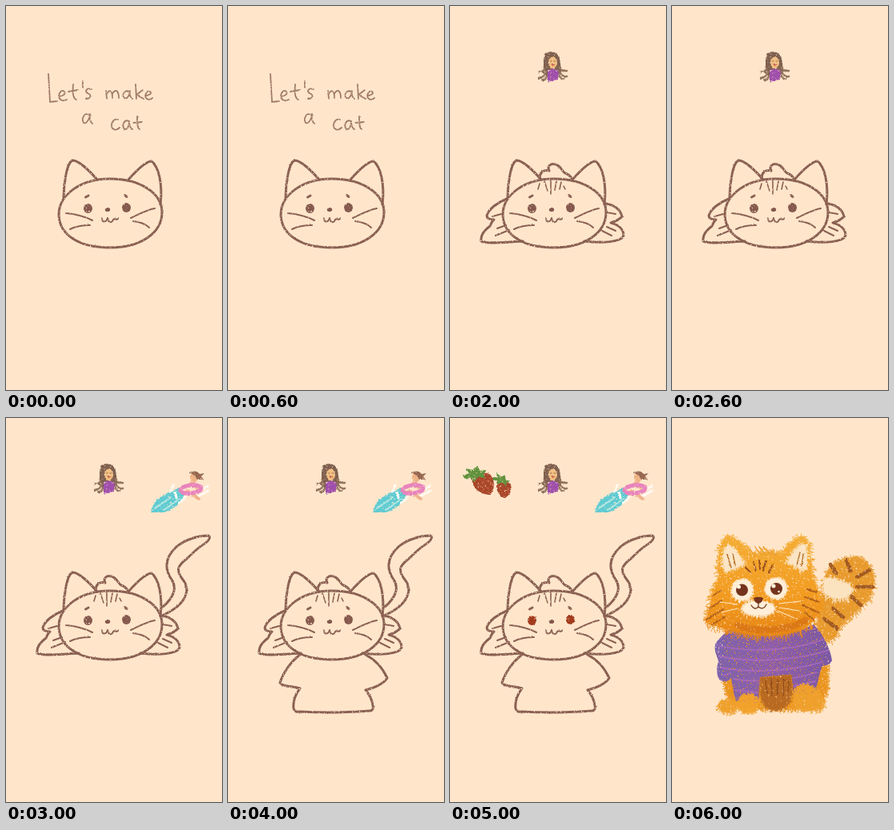
These frames come from a looping animation (270x480 px, 7 s). An HTML page:

```html
<!DOCTYPE html>
<html lang="en">
<head>
<meta charset="utf-8">
<title>Let's make a cat</title>
<style>
  html, body { margin: 0; height: 100%; overflow: hidden; background: #ffe6cb; }
  svg { display: block; width: 100vw; height: 100vh; }
  path, ellipse { stroke-linecap: round; stroke-linejoin: round; }
  .line { fill: none; stroke: #8a6052; stroke-width: 3; }
  .thin { stroke-width: 2; }
  .letters { stroke: #a07b68; stroke-width: 1.8; }
  .dot { fill: #85594d; stroke: none; }
  .chalk { filter: url(#chalk); }
  .pastel { filter: url(#pastel); }
  .stroke { fill: none; }
</style>
</head>
<body>
<svg viewBox="0 0 270 480" role="img" aria-label="Let's make a cat">
  <defs>
    <filter id="chalk" filterUnits="userSpaceOnUse" x="0" y="0" width="270" height="480" color-interpolation-filters="sRGB">
      <feTurbulence type="fractalNoise" baseFrequency=".55" numOctaves="2" seed="4" result="noise"/>
      <feDisplacementMap in="SourceGraphic" in2="noise" scale="1.8" xChannelSelector="R" yChannelSelector="G" result="rough"/>
      <feColorMatrix in="noise" values="0 0 0 0 0  0 0 0 0 0  0 0 0 0 0  0 0 0 6 -1.3"/>
      <feComposite in="rough" operator="in"/>
    </filter>
    <filter id="pastel" filterUnits="userSpaceOnUse" x="0" y="0" width="270" height="480" color-interpolation-filters="sRGB">
      <feTurbulence type="fractalNoise" baseFrequency=".4" numOctaves="3" seed="9" result="noise"/>
      <feDisplacementMap in="SourceGraphic" in2="noise" scale="3" xChannelSelector="R" yChannelSelector="G" result="rough"/>
      <feColorMatrix in="noise" values="0 0 0 0 0  0 0 0 0 0  0 0 0 0 0  0 0 0 4 -.5"/>
      <feComposite in="rough" operator="in"/>
    </filter>
    <linearGradient id="orange" gradientUnits="userSpaceOnUse" x1="0" y1="150" x2="0" y2="275">
      <stop stop-color="#f4ad35"/>
      <stop offset=".6" stop-color="#f29a1f"/>
      <stop offset="1" stop-color="#e68413"/>
    </linearGradient>
    <linearGradient id="violet" gradientUnits="userSpaceOnUse" x1="52" y1="0" x2="200" y2="0">
      <stop stop-color="#7c62ad"/>
      <stop offset=".5" stop-color="#8e5eaa"/>
      <stop offset="1" stop-color="#7a58a5"/>
    </linearGradient>
  </defs>

  <!-- data-show: first second, end second -->
  <g data-show="0 1" class="line letters chalk">
    <path d="M53 85L55 120L64 119M66 113C71 113 75 110 73 107C70 104 66 108 66 113C67 119 73 119 76 117M84 98C83 108 84 116 88 117M78 107L90 105M96 94L96 102M107 104C100 102 98 107 102 109C107 111 107 116 100 116"/>
    <path d="M125 106L126 116M126 110C129 104 133 105 133 115M133 110C136 103 141 105 141 115M154 107C148 104 144 112 148 115C152 117 155 110 155 106C154 111 156 115 158 116M162 98L163 116M171 105L163 111L172 116M174 112C179 112 183 109 180 107C176 105 173 111 175 115C177 118 181 117 183 115"/>
    <path d="M104 136C98 132 94 141 97 146C101 148 105 140 105 135C104 141 106 146 108 147M140 142C134 140 130 148 133 153C136 156 140 154 142 152M154 144C148 141 144 149 148 154C152 155 154 149 154 144C154 150 156 153 158 154M164 138C164 146 164 153 167 154M159 146L170 145"/>
  </g>

  <g data-show="0 6" class="line chalk">
    <path d="M66 261C66 236 93 216 130 216C168 216 195 234 195 258C195 284 168 302 130 302C92 302 67 287 66 261Z"/>
    <path d="M72 240C72 222 76 196 83 193C92 193 105 207 114 217M153 217C161 208 174 194 182 194C191 201 196 223 193 248"/>
    <path class="thin" d="M75 259C88 260 98 263 108 268M80 279C88 275 97 274 105 274M156 265C165 261 175 255 186 253M159 269C168 270 175 273 179 277"/>
    <path class="thin" d="M120 265C120 271 125 271 127 265C128 271 132 272 134 267C136 265 138 268 140 266"/>
    <path d="M99.500 239L103 237M148.500 236.500L151 238.500"/>
    <ellipse class="dot" cx="127" cy="254.500" rx="3.200" ry="2.600"/>
    <g id="eyes">
      <ellipse class="dot" cx="102.500" cy="253" rx="5.500" ry="6"/>
      <ellipse class="dot" cx="150.500" cy="252" rx="5.500" ry="6"/>
    </g>
  </g>

  <g data-show="5 6" class="pastel" fill="#a33a1c">
    <ellipse cx="102.500" cy="253" rx="5.500" ry="6"/>
    <ellipse cx="150.500" cy="252" rx="5.500" ry="6"/>
  </g>

  <g data-show="1 6" class="line chalk">
    <path d="M112 216C112 208 117 204 124 206C121 200 126 196 132 198C139 200 140 207 144 209C148 210 151 213 153 217"/>
    <path d="M71 241C60 245 48 254 46 262C46 266 51 267 55 267C51 270 52 272 50 275C42 281 38 288 39 294C43 298 70 295 91 294"/>
    <path d="M195 247C206 249 213 255 215 263C212 267 207 269 201 271C209 273 217 278 217 287C214 295 192 297 168 294"/>
  </g>

  <!-- girl -->
  <g data-show="1 6" class="pastel">
    <path fill="#80604f" d="M119 59C125 56 133 57 136 62C139 70 137 76 141 80L136 86L120 87L115 83C119 78 115 64 119 59Z"/>
    <path class="stroke" stroke="#94765f" stroke-width="2.500" d="M118 78Q117 83 111 82M119 82Q119 89 111 90M121 88Q119 93 115 92M137 77Q140 82 146 81M137 82Q140 89 146 88M137 87Q138 92 142 91"/>
    <path fill="#a050ab" d="M122 81C126 78 132 78 136 82L135 92C130 94 126 93 122 95Z"/>
    <ellipse fill="#efbd80" cx="128.500" cy="71" rx="5.500" ry="7.500"/>
    <path class="stroke" stroke="#70473a" d="M126 69h.5M131 69h.5"/>
    <path class="stroke" stroke="#c14f42" d="M126.500 73.500h4"/>
  </g>

  <g data-show="2 6" class="line thin chalk">
    <path style="stroke-width:1.600" d="M112 222L110 229M118 219L122 231M126 218L126 235M133 219L131 230M139 220L137 229M142 225L144 229"/>
    <path d="M53 263L64 260M59 278L70 274M57 287L74 280M196 258L207 260M196 276L207 281M188 280L202 287"/>
  </g>

  <g data-show="3 6" class="line chalk">
    <path d="M196 236C208 226 215 213 207 202C197 187 200 173 213 161C225 151 242 147 253 147C257 149 253 154 247 158C240 162 233 169 227 175C214 185 212 190 221 202C231 214 226 233 197 246"/>
  </g>

  <!-- swimmer -->
  <g data-show="3 6" class="pastel">
    <path fill="#5fcbd2" d="M181 118C183 106 192 97 206 92L217 87L223 95C220 105 209 115 197 118Z"/>
    <path class="stroke" stroke="#b4e8e2" stroke-width="2" d="M186 113L206 99M197 115L217 101"/>
    <path class="stroke" stroke="#fffaf3" stroke-width="3" d="M206 92L209 84M211 93L213 99M217 106L224 99M238 99L253 91M247 89L252 85"/>
    <path class="stroke" stroke="#efb48d" stroke-width="4" d="M226 91L241 101M237 77L230 83L239 87"/>
    <ellipse class="stroke" stroke="#e983bd" stroke-width="5" cx="231" cy="89" rx="13" ry="5" transform="rotate(-6 231 89)"/>
    <ellipse fill="#efb485" cx="234" cy="74" rx="4" ry="5"/>
    <path fill="#986850" d="M229 69C234 65 239 66 242 70L248 69L244 73L247 77L239 77L236 72Z"/>
  </g>

  <g data-show="4 6" class="line chalk">
    <path d="M90 296C79 304 69 318 65 331C68 336 80 335 90 338C84 345 81 355 82 363C83 367 86 368 90 367C120 369 150 368 177 366C181 366 182 363 181 359C180 352 177 346 172 340C182 338 195 332 199 325C193 312 184 302 172 296"/>
  </g>

  <g data-show="5 6" class="pastel">
    <g id="berry">
      <path fill="#a9462a" d="M27 76C33 67 49 66 52 73C57 81 55 91 50 96C40 96 28 89 27 76Z"/>
      <path class="stroke" stroke="#d98a58" stroke-width="1.200" stroke-dasharray=".5 4.500" d="M31 79L45 92M37 77L50 90M44 75L51 83"/>
      <path fill="#62923e" d="M16 72L24 69L19 63L29 65L34 60L38 66L46 65L42 70L44 76L36 73L29 80L26 74L19 77Z"/>
    </g>
    <use href="#berry" transform="translate(66 84) rotate(26) scale(.73) translate(-38 -77)"/>
  </g>

  <!-- painted cat -->
  <g data-show="6 7">
    <g class="pastel">
      <path data-fuzz="6" fill="#e89a2c" d="M182 268C184 250 180 235 190 215C188 185 212 172 233 175C251 181 257 205 248 221C241 238 217 246 207 268C200 282 185 280 182 268Z"/>
      <path data-fuzz="7" fill="#fce3bf" d="M190 203C198 195 206 205 216 206C227 209 227 219 218 223C208 228 197 224 190 218Z"/>
      <path class="stroke" stroke="#a35a20" stroke-width="4.500" d="M218 178L223 191M247 190L231 199M251 211L231 211M236 234L224 223M214 249L201 238M198 183L205 194M206 263L190 251"/>
      <path data-fuzz="4" fill="#ea951f" d="M70 270L182 265C192 285 197 318 194 342C188 360 160 366 130 364C100 364 72 362 69 345C62 325 60 290 70 270Z"/>
    </g>
    <g class="chalk">
      <path fill="url(#violet)" d="M74 261C66 270 58 275 54 283C52 292 57 298 58 304C55 313 56 322 59 327C64 331 70 330 74 325C76 337 77 347 81 355L108 357L110 324L149 321L152 345C163 347 176 346 180 341C182 330 184 320 188 310C193 309 199 308 200 303C198 287 188 270 177 258C140 276 100 277 74 261Z"/>
      <path class="stroke" stroke="#a568bf" stroke-width="1.800" d="M57 284C95 294 150 291 189 277M60 298C95 306 150 304 194 291M61 312C95 319 150 317 188 305M63 322L73 319M77 326C105 331 150 329 180 318M79 340L106 343M153 335L179 329"/>
    </g>
    <g class="pastel">
      <path data-fuzz="3" fill="#b86a22" d="M111 325L148 322C152 345 149 363 130 365C113 365 109 350 111 325Z"/>
      <path class="stroke" stroke="#8e4b1c" stroke-width="1.300" d="M117 329L119 345M124 326L125 347M132 327L132 345M140 326L139 347M146 328L145 341"/>
      <ellipse data-fuzz="4" fill="#efa02c" cx="70" cy="360" rx="12" ry="8"/>
      <ellipse data-fuzz="3" fill="#f2a22a" cx="95" cy="357" rx="13" ry="12"/>
      <path data-fuzz="4" fill="#efa02c" d="M153 340C160 332 174 332 179 340C190 346 193 357 188 363C178 367 160 366 153 361C150 353 155 347 153 340Z"/>
    </g>
    <g class="pastel">
      <path data-fuzz="7" fill="url(#orange)" d="M59 202C57 182 58 157 68 148C79 148 91 160 100 171C110 167 125 167 137 170C143 160 153 149 163 148C172 153 175 175 174 195C180 208 185 224 187 237C182 250 170 260 162 264C140 274 100 274 74 266C63 262 51 260 42 255C44 246 50 236 49 228C50 217 54 208 59 202Z"/>
      <path class="stroke" stroke="#db7815" stroke-width="8" d="M82 259C105 269 145 266 167 253"/>
      <path data-fuzz="5" fill="#fbe5c4" d="M67 192C62 180 64 165 70 159C79 163 86 175 90 183ZM145 181C149 170 158 160 165 158C170 168 169 180 166 190Z"/>
      <path class="stroke" stroke="#b8742f" stroke-width="1.500" d="M69 171L74 187M76 170L79 184M160 168L156 184M164 170L162 185"/>
      <path class="stroke" stroke="#eda031" stroke-width="1.800" d="M104 172L95 162M111 171L104 162M117 171L109 161M124 171L114 161M130 172L123 165"/>
      <path class="stroke" stroke="#964c18" stroke-width="2" d="M92 187L98 193M102 180L105 191M109 178L110 189M117 179L114 191M126 183L121 193"/>
      <path class="stroke" stroke="#b0601b" stroke-width="2" d="M169 214L181 218M166 224L184 230M163 234L183 243M166 243L177 252M61 216L51 222M62 228L47 238M64 239L43 252M66 249L50 258"/>
      <g fill="#ffefd8">
        <ellipse data-fuzz="3" cx="88" cy="215" rx="13" ry="13"/>
        <ellipse data-fuzz="3" cx="130" cy="213" rx="13" ry="13"/>
        <ellipse data-fuzz="4" cx="108" cy="238" rx="20" ry="9"/>
      </g>
    </g>
    <g>
      <g fill="#74331c">
        <ellipse cx="87.500" cy="215" rx="7.500" ry="7.500"/>
        <ellipse cx="130.500" cy="213.500" rx="7.500" ry="7.500"/>
        <path d="M102 225Q108 222 114 225Q113 231 108 232Q103 231 102 225Z"/>
      </g>
      <path class="stroke" stroke="#74331c" stroke-width="1.300" d="M108 231L108 236M99 234Q103 241 108 236Q114 241 118 233"/>
      <path class="stroke" stroke="#ffe6bd" stroke-width="1.100" d="M134 232L160 229M134 237L159 241M132 241L153 250M82 233L60 230M82 238L62 243"/>
      <g fill="#fff4e2">
        <ellipse cx="83.500" cy="211" rx="2.500" ry="2.500"/>
        <ellipse cx="127" cy="210" rx="2.500" ry="2.500"/>
        <ellipse cx="133.500" cy="217" rx="1.300" ry="1.300"/>
      </g>
    </g>
  </g>
</svg>
<script>
  let seed = 7;
  const random = () => (seed = seed * 16807 % 2147483647) / 2147483647;

  // Add short hairs along a clockwise outline, leaning outward and down.
  function addFur(shape) {
    const hairLength = +shape.dataset.fuzz, total = shape.getTotalLength();
    let d = '';
    for (let at = 0; at < total; at += 0.9) {
      const p = shape.getPointAtLength(at), q = shape.getPointAtLength((at + 0.5) % total);
      const angle = Math.atan2(q.y - p.y, q.x - p.x) - Math.PI / 2 + (random() - 0.5) * 1.6;
      const reach = hairLength * random() ** 1.5;
      d += `M${p.x} ${p.y}l${Math.cos(angle) * reach} ${(Math.sin(angle) + 0.3) * reach}`;
    }
    const fur = document.createElementNS(shape.namespaceURI, 'path');
    fur.setAttribute('d', d);
    fur.style.stroke = getComputedStyle(shape).fill;
    shape.after(fur);
  }
  document.querySelectorAll('[data-fuzz]').forEach(addFur);

  const layers = [...document.querySelectorAll('[data-show]')].map(node => {
    const [from, to] = node.dataset.show.split(' ').map(Number);
    return { node, from, to };
  });
  const eyes = document.getElementById('eyes');

  function draw(now) {
    const second = now / 1000 % 7;
    for (const { node, from, to } of layers) {
      node.style.display = second >= from && second < to ? '' : 'none';
    }
    eyes.style.display = second < 5 ? '' : 'none';
    requestAnimationFrame(draw);
  }
  draw(performance.now());
</script>
</body>
</html>
```
